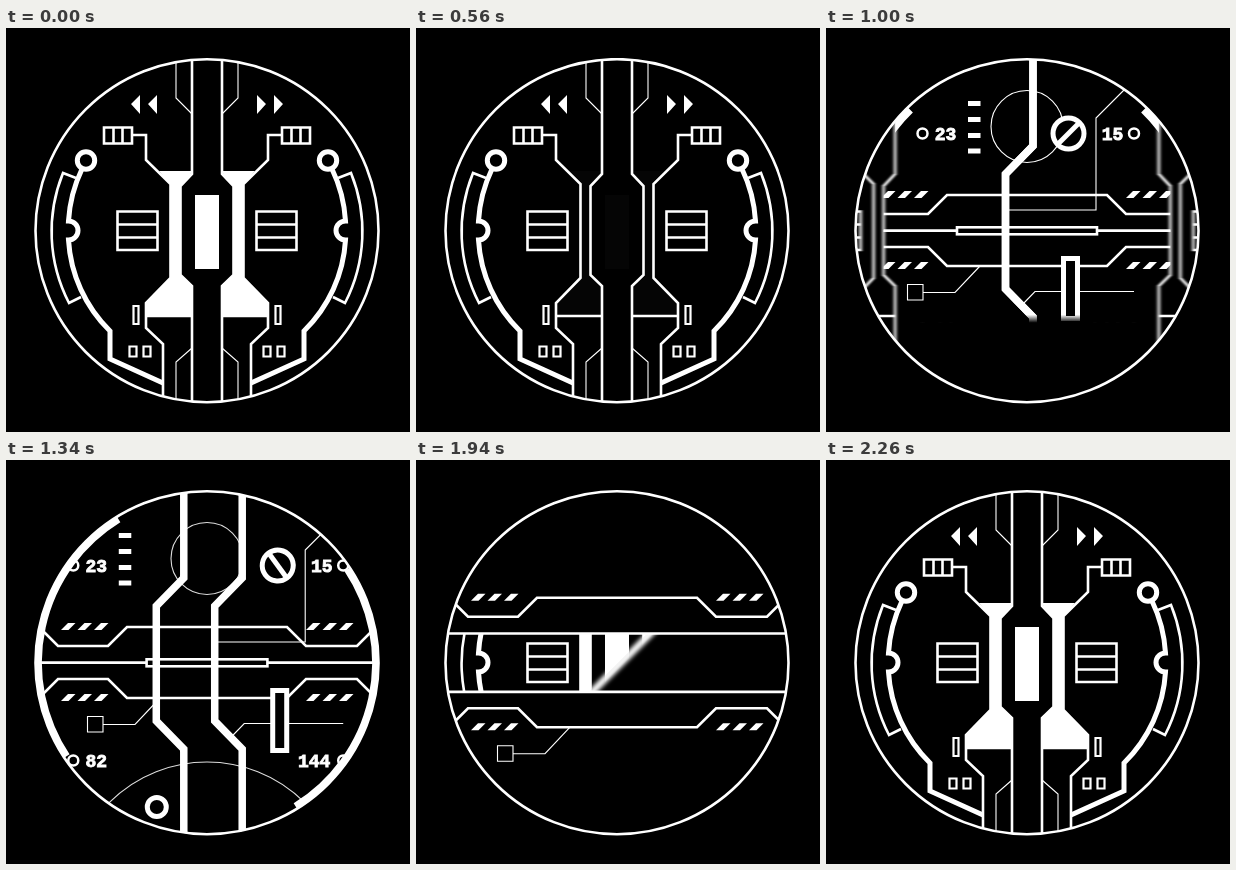
Recreate the animation shown at these times as an HTML page. Size 404 by 404 pixels, loop 2380 ms.

```html
<!DOCTYPE html>
<html lang="en">
<head>
<meta charset="utf-8">
<title>Circular interface loop</title>
<style>
html, body { margin: 0; width: 100%; height: 100%; overflow: hidden; background: #000; }
svg { display: block; width: 100vw; height: 100vh; }
text { font: bold 18px "Liberation Mono", monospace; fill: #fff; stroke: #fff; stroke-width: .9; text-anchor: middle; }
.l { fill: none; stroke: #fff; stroke-width: 2.6; }
.thin { stroke-width: 1.1; }
.bold { stroke-width: 5; }
.w { fill: #fff; stroke: none; }
.k { fill: #000; }
</style>
</head>
<body>
<svg viewBox="0 0 404 404">
  <defs>
    <clipPath id="disc"><circle cx="201" cy="202.7" r="172"/></clipPath>
    <clipPath id="gap"><polygon id="gapShape"/></clipPath>
    <clipPath id="band"><rect id="bandShape" width="404"/></clipPath>
    <linearGradient id="downFade" gradientUnits="userSpaceOnUse" x1="0" x2="0">
      <stop offset="0" stop-color="#fff"/><stop offset="1" stop-color="#000"/>
    </linearGradient>
    <linearGradient id="diagFade" gradientUnits="userSpaceOnUse">
      <stop offset="0" stop-color="#fff"/><stop offset="1" stop-color="#000"/>
    </linearGradient>
    <mask id="down" maskUnits="userSpaceOnUse" x="0" y="0" width="404" height="404">
      <rect width="404" height="404" fill="url(#downFade)"/>
    </mask>
    <mask id="diag" maskUnits="userSpaceOnUse" x="0" y="0" width="404" height="404">
      <rect width="404" height="404" fill="url(#diagFade)"/>
    </mask>
    <filter id="smear" filterUnits="userSpaceOnUse" x="0" y="0" width="404" height="404">
      <feGaussianBlur id="smearBlur" stdDeviation="0 0"/>
    </filter>
    <filter id="soft" filterUnits="userSpaceOnUse" x="0" y="0" width="404" height="404">
      <feGaussianBlur stdDeviation="2.3"/>
    </filter>

    <g id="half">
      <g class="l">
        <path d="M186 20V146L174.500 158V247L186 258V386"/>
        <path d="M126 107H140V132L164.500 156V250L140 275V300L157 316V386M140 288H186" />
        <path class="thin" d="M170 20V70L186 86M170 386V334L186 320"/>
        <path d="M98 99.500H126V115.500H98ZM107.500 99V116M116.500 99V116"/>
        <path d="M111.500 183.500H151.500V222H111.500ZM111 196.500H152M111 209.500H152"/>
        <path stroke-width="2.2" d="M127.500 278H132.500V296H127.500ZM123.500 318.500H130.500V328.500H123.500ZM137.500 318.500H144.500V328.500H137.500Z"/>
        <path d="M70 150L57 145A155.500 155.500 0 0 0 63 275L75 269"/>
        <circle class="bold" cx="80" cy="132.500" r="8.700"/>
        <path class="bold" d="M76 141A139 139 0 0 0 62.500 193A9.500 9.500 0 0 1 62.500 212A139 139 0 0 0 104 303V331L157 355"/>
      </g>
      <path class="w" d="M125 76L134 67V86ZM142 76L151 67V86Z"/>
      <path class="w fillIn" d="M153 143H187L175 158V247L186 258V288H140V275L164 250V156Z"/>
    </g>

    <g id="slants" class="w">
      <path id="slant" d="M55 170L62 163H69.500L62.500 170Z"/>
      <use href="#slant" x="16.500"/><use href="#slant" x="33"/>
    </g>
    <path id="zig" class="l" stroke-width="8" style="stroke-width:7.5" d="M207 20V118L179.500 146V261L207 289V386"/>
    <circle id="dot" class="l" r="5" style="stroke-width:2.5"/>
  </defs>

  <rect width="404" height="404"/>
  <g clip-path="url(#disc)">
    <g id="second" mask="url(#down)"><g clip-path="url(#gap)">
      <g id="fading" class="l">
        <circle class="thin" cx="201" cy="98.500" r="36"/>
        <circle class="thin" cx="201" cy="440" r="138"/>
      </g>
      <g id="upper">
        <path class="l" d="M20 154L52 186H102L121 167H281L300 186H351L383 154M20 202.700H382"/>
        <use href="#slants"/><use href="#slants" x="245"/>
      </g>
      <g id="lower">
        <path class="l" d="M20 251L52 219H102L121 238H281L300 219H351L383 251M20 202.700H382"/>
        <use href="#slants" y="71"/><use href="#slants" x="245" y="71"/>
        <path class="l thin" d="M81.500 256.500H97V272H81.500ZM97 264.500H129L154 238"/>
      </g>
      <g id="moving">
        <rect id="slot" class="l k" y="199.300" height="7"/>
        <g id="left">
          <use href="#zig"/>
          <path class="w" d="M142 73H154.500V78H142ZM142 89H154.500V94H142ZM142 105H154.500V110H142ZM142 120.500H154.500V125.500H142Z"/>
          <use href="#dot" x="96.500" y="105.500"/><use href="#dot" x="96.500" y="300.500"/>
          <text x="119.500" y="112">23</text><text x="119.500" y="307">82</text>
          <circle class="l k bold" cx="180" cy="347" r="9.500"/>
        </g>
        <g id="right">
          <path class="l thin" d="M181 182H270V90L310 50M196 277L209 263.500H308"/>
          <use href="#zig"/>
          <use href="#dot" x="308" y="105.500"/><use href="#dot" x="308" y="300.500"/>
          <text x="286.500" y="112">15</text><text x="279" y="307">144</text>
          <rect class="l k bold" x="237.500" y="230.500" width="14" height="60"/>
          <g transform="translate(242.500 105.500)"><g id="wheel" class="l">
            <circle class="k bold" r="15.500"/><path class="bold" d="M-10 10L10 -10"/>
          </g></g>
        </g>
        <path id="arcs" class="l"/>
      </g>
    </g></g>

    <g id="bandClip"><g id="first">
      <g id="halfL"><use href="#half"/></g>
      <g id="halfR"><use href="#half" transform="matrix(-1 0 0 1 402 0)"/></g>
      <rect class="w fillIn" x="189" y="167" width="24" height="74"/>
    </g></g>
    <g clip-path="url(#band)"><path id="streak" class="l" style="stroke-width:7" filter="url(#soft)"/></g>
  </g>
  <circle class="l" cx="201" cy="202.700" r="171.500"/>
</svg>
<script>
const LOOP = 2380, STEP = 20, SPAN = 540, REACH = 213;
const CX = 201, CY = 202.7;
const el = id => document.getElementById(id);
const fills = document.querySelectorAll('.fillIn');

const set = (id, attrs) => {
  for (const k in attrs) el(id).setAttribute(k, attrs[k]);
};
const show = (id, on) => set(id, { display: on ? 'inline' : 'none' });
const shift = (id, x, y) => set(id, { transform: `translate(${x} ${y})` });
const part = (t, start) => Math.min(1, Math.max(0, (t - start) / SPAN));

// Two opposite arcs of the rim, turned by the given angle
function rimArcs(turn, width) {
  const r = 172.8 - width / 2;
  const at = deg => {
    const a = deg * Math.PI / 180;
    return `${CX + r * Math.cos(a)} ${CY + r * Math.sin(a)}`;
  };
  return [0, 180].map(c => `M${at(c + turn - 46)}A${r} ${r} 0 0 1 ${at(c + turn + 46)}`).join('');
}

function draw(t) {
  const fade = part(t, 60), open = part(t, 600), roll = part(t, 1140), split = part(t, 1740);
  const d = REACH * open * open;
  const e = roll * roll;
  const s = REACH * split * split;
  const back = t >= 1680;

  // Panels: fills fade, then the halves slide apart
  fills.forEach(f => f.setAttribute('opacity', back ? 1 : Math.pow(1 - fade, 1.5)));
  show('first', t < 1140 || back);
  const off = back ? 0 : d;
  shift('halfL', -off, 0);
  shift('halfR', off, 0);
  set('smearBlur', { stdDeviation: `${2 * open} 0` });
  set('first', { filter: !back && open > 0 ? 'url(#smear)' : 'none' });

  // Second screen appears from the top, between the halves
  show('second', t > 600 && t < 2240);
  const edge = 30 + 352 * open;
  set('downFade', { y1: edge - 4, y2: edge + 4 });
  const side = [[186, 0], [186, 146], [174.5, 158], [174.5, 247], [186, 258], [186, 404]];
  const gap = side.map(([x, y]) => [x - d, y])
    .concat(side.map(([x, y]) => [2 * CX - x + d, y]).reverse());
  set('gapShape', { points: gap.join(' ') });

  // Its parts leave sideways while the rim turns
  show('moving', !back);
  shift('left', -REACH * e, 0);
  shift('right', REACH * e, 0);
  set('wheel', { transform: `rotate(${720 * e})` });
  const w = 140 * (1 - e);
  set('slot', { x: CX - w / 2, width: w });
  set('fading', { opacity: 1 - e });
  const rim = 8.5 - 6 * e;
  set('arcs', { d: rimArcs(90 * e, rim), style: `stroke-width:${rim}` });

  // Middle line splits and the panels are wiped in diagonally
  shift('upper', 0, -s);
  shift('lower', 0, s);
  set('bandShape', { y: CY - s, height: 2 * s });
  const sum = 408 + 0.87 * (t - 1940);
  set('diagFade', { x1: sum / 2 - 2, y1: sum / 2 - 2, x2: sum / 2 + 2, y2: sum / 2 + 2 });
  const wiping = back && t < 2260;
  set('bandClip', {
    'clip-path': wiping ? 'url(#band)' : 'none',
    mask: wiping ? 'url(#diag)' : 'none'
  });
  show('streak', wiping && s > 0);
  set('streak', { d: `M${sum - 400} 400L${sum} 0` });
}

function tick() {
  draw(Math.floor(performance.now() % LOOP / STEP) * STEP);
  requestAnimationFrame(tick);
}
tick();
</script>
</body>
</html>
```
